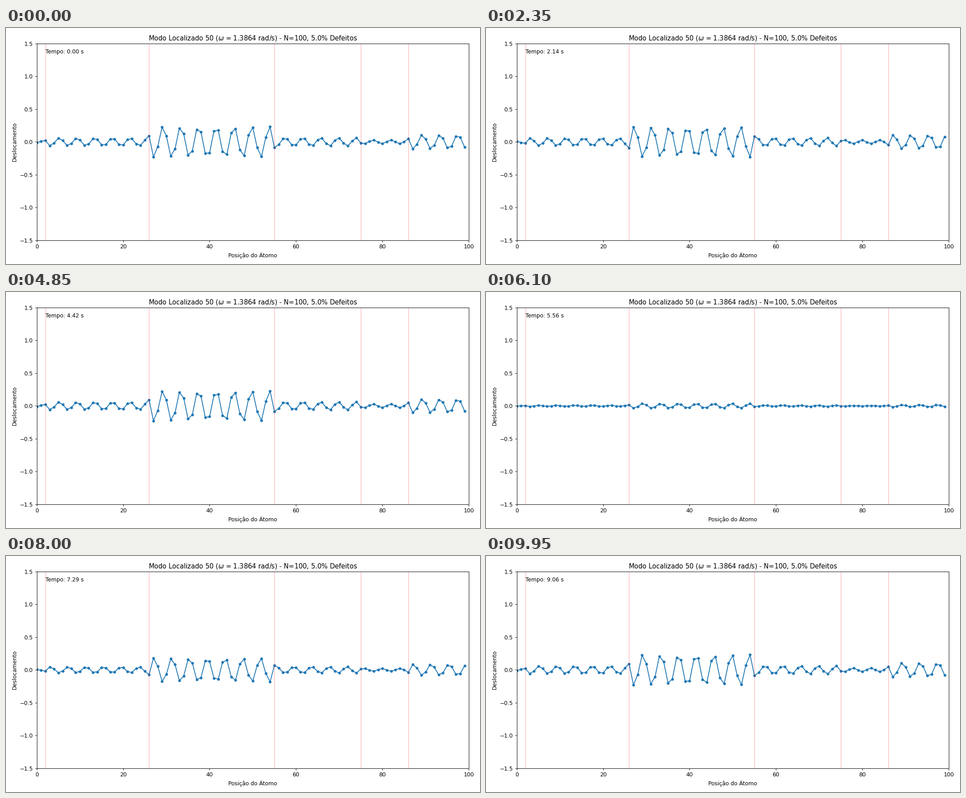
A matplotlib script that plays this animation: 1058 by 529 pixels, repeating every 10000 ms.

```python
import numpy as np
import matplotlib.pyplot as plt
from matplotlib.animation import FuncAnimation

N = 100
FRAMES = 200
DEFECTS = [2, 26, 55, 75, 86]
DEFECT_MASS = 3.0
OMEGA = 1.3864
DPI = 88.167        # 12 x 6 inches give 1058 x 529 pixels
LAYOUT_DPI = 100    # margins are fitted at this resolution


def chain_mode(target):
    """Mass-weighted normal mode of a free chain, nearest to a frequency."""
    mass = np.ones(N)
    mass[DEFECTS] = DEFECT_MASS
    stiff = 2 * np.eye(N) - np.eye(N, k=1) - np.eye(N, k=-1)
    stiff[0, 0] = stiff[-1, -1] = 1
    values, vectors = np.linalg.eigh(stiff / np.sqrt(np.outer(mass, mass)))
    freqs = np.sqrt(np.abs(values))
    i = np.argmin(np.abs(freqs - target))
    mode = vectors[:, i]
    return freqs[i], mode * np.sign(mode[54])


omega, mode = chain_mode(OMEGA)
sites = np.arange(N)
times = np.linspace(0, 4 * np.pi / omega, FRAMES)

fig, ax = plt.subplots(figsize=(12, 6), dpi=DPI)
line, = ax.plot(sites, mode, "o-", color="#1f77b4", markersize=4, linewidth=1.5)
for site in DEFECTS:
    ax.axvline(site, color="red", alpha=0.3, linewidth=1)
ax.set_xlim(0, N)
ax.set_ylim(-1.5, 1.5)
ax.set_xlabel("Posição do Átomo")
ax.set_ylabel("Deslocamento")
# Slightly under 12 pt, so that glyph widths round down at this resolution
ax.set_title(rf"Modo Localizado 50 ($\omega$ = {omega:.4f} rad/s)"
             f" - N={N}, {100 * len(DEFECTS) / N:.1f}% Defeitos",
             fontsize=11.94)
clock = ax.text(0.02, 0.95, "", transform=ax.transAxes)

fig.set_dpi(LAYOUT_DPI)
fig.tight_layout()
fig.set_dpi(DPI)


def update(frame):
    t = times[frame]
    line.set_ydata(mode * np.cos(omega * t))
    clock.set_text(f"Tempo: {t:.2f} s")
    return line, clock


anim = FuncAnimation(fig, update, frames=FRAMES, interval=50,
                     repeat=True, repeat_delay=0)
plt.show()
```
